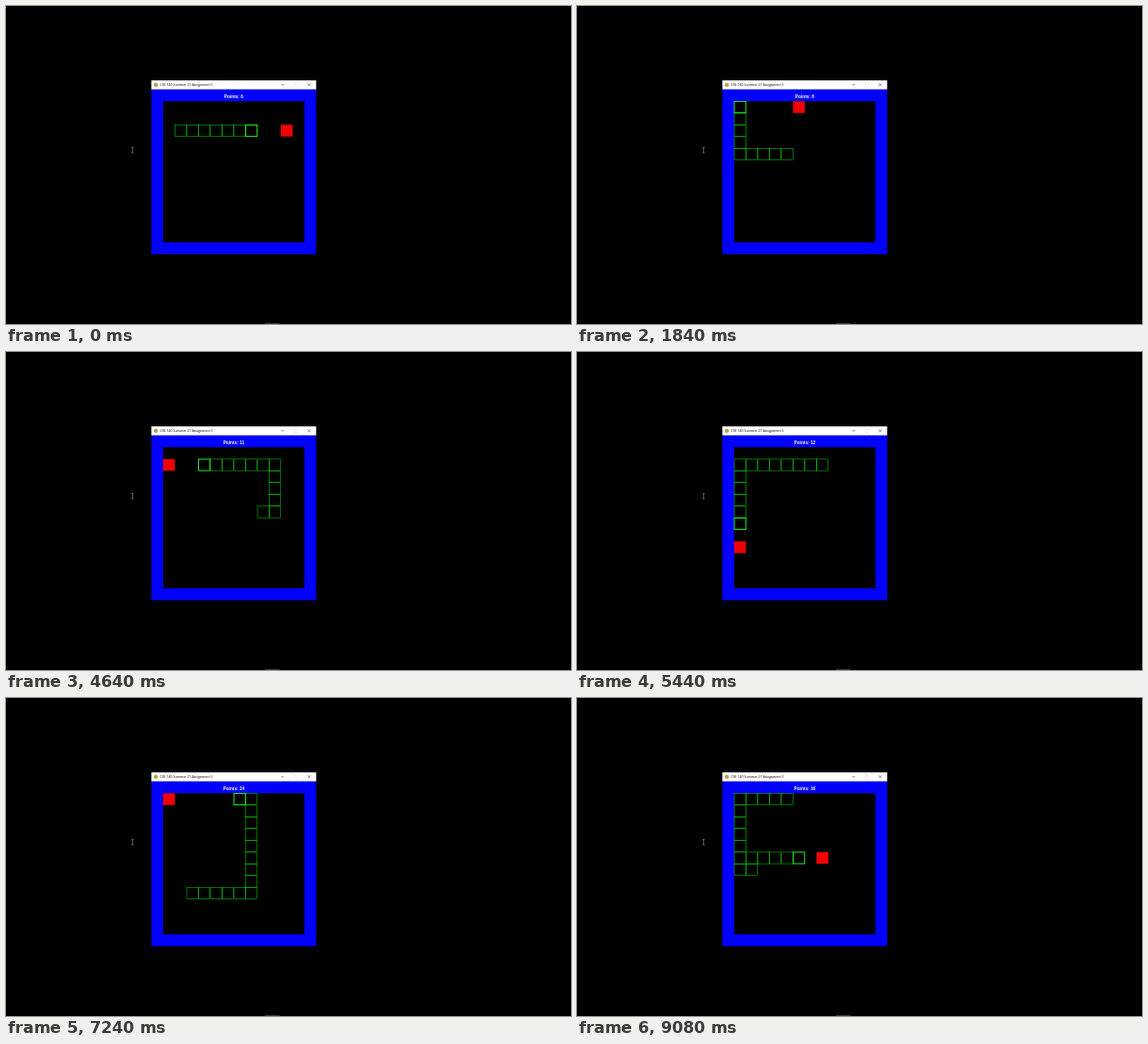
Write an HTML page with a canvas that moves like this. It is 600 by 338 pixels and loops after 9120 ms.

```html
<!DOCTYPE html>
<html lang="en">
<head>
<meta charset="utf-8">
<title>Snake</title>
<style>
  html, body { margin: 0; height: 100%; overflow: hidden; background: #000; }
  canvas { display: block; }
</style>
</head>
<body>
<canvas width="600" height="338"></canvas>
<script>
const ctx = document.querySelector('canvas').getContext('2d');
const LOOP = 9120, STEP = 100, LEAD = 90;
const SCALE = 0.3125;                       // drawn in screen pixels of a 1920 wide desktop
const WIN = { x: 494, y: 253, size: 560, bar: 31 };
const CELL = 40, FIELD = 480;
const FIELD_X = WIN.x + CELL, FIELD_Y = WIN.y + WIN.bar + CELL;
const START_LENGTH = 7, START_POINTS = 6;

const MOVES = 'R3 D2 L10 U4 R5 D1 L2 D3 R1 D1 R5 U4 L9 D7 R7 U8 L7 D6 R1 U1 R4';
const FOODS = [[10, 2], [0, 4], [5, 0], [4, 5], [9, 5], [0, 1],
               [0, 8], [7, 8], [0, 0], [1, 5], [7, 5]];
const DIRS = { R: [1, 0], L: [-1, 0], U: [0, -1], D: [0, 1] };

// Every cell the head visits, preceded by the starting body.
const trail = [];
for (let col = 1; col <= START_LENGTH; col++) trail.push([col, 2]);

// Foods eaten after each step.
const eaten = [0];
for (const move of MOVES.split(' ')) {
  const [dx, dy] = DIRS[move[0]];
  for (let i = +move.slice(1); i > 0; i--) {
    const [x, y] = trail[trail.length - 1];
    const count = eaten[eaten.length - 1];
    const [foodX, foodY] = FOODS[count];
    trail.push([x + dx, y + dy]);
    eaten.push(count + (x + dx === foodX && y + dy === foodY ? 1 : 0));
  }
}

function rect(color, x, y, w, h) {
  ctx.fillStyle = color;
  ctx.fillRect(x, y, w, h);
}

function line(color, width, ...points) {
  ctx.strokeStyle = color;
  ctx.lineWidth = width;
  ctx.beginPath();
  for (let i = 0; i < points.length; i += 4) {
    ctx.moveTo(points[i], points[i + 1]);
    ctx.lineTo(points[i + 2], points[i + 3]);
  }
  ctx.stroke();
}

function label(text, font, color, align, x, y) {
  ctx.font = font;
  ctx.fillStyle = color;
  ctx.textAlign = align;
  ctx.fillText(text, x, y);
}

function outline([col, row], color, width, inset) {
  ctx.strokeStyle = color;
  ctx.lineWidth = width;
  ctx.strokeRect(FIELD_X + col * CELL + inset, FIELD_Y + row * CELL + inset,
                 CELL - 2 * inset, CELL - 2 * inset);
}

function drawDesktop() {
  rect('#000', 0, 0, 1920, 1082);
  rect('#444', 880, 1078, 50, 3);
  line('#999', 2, 430, 481, 430, 499, 426, 481, 434, 481, 426, 499, 434, 499);
}

function drawWindow(points) {
  rect('#fff', WIN.x, WIN.y, WIN.size, WIN.bar);
  rect('#0000fb', WIN.x, WIN.y + WIN.bar, WIN.size, WIN.size);
  rect('#000', FIELD_X, FIELD_Y, FIELD, FIELD);

  ctx.fillStyle = '#b5a758';
  ctx.beginPath();
  ctx.arc(509, 268, 7.5, 0, 2 * Math.PI);
  ctx.fill();
  label('CSE 140 Summer 21 Assignment 5', '11.3px "Open Sans", sans-serif',
        '#000', 'left', 523, 272);
  line('#222', 1.5, 935, 268, 945, 268);
  ctx.strokeStyle = '#ccc';
  ctx.lineWidth = 1;
  ctx.strokeRect(981, 263, 10, 10);
  line('#222', 1.5, 1025, 263, 1035, 273, 1035, 263, 1025, 273);

  label('Points: ' + points, 'bold 15.2px "Liberation Sans", Arial, sans-serif',
        '#fff', 'center', 774, 313.5);
}

function drawGame(step) {
  const food = FOODS[eaten[step]];
  rect('#f00000', FIELD_X + food[0] * CELL, FIELD_Y + food[1] * CELL, CELL, CELL);

  // The tail grows one step after a food is eaten.
  const length = START_LENGTH + eaten[Math.max(0, step - 1)];
  const end = START_LENGTH + step;
  const body = trail.slice(end - length, end);
  const head = body.pop();
  for (const cell of body) outline(cell, '#0f0', 1.4, 0.5);
  outline(head, '#20ff20', 3, 0.5);
}

function frame() {
  const time = performance.now() % LOOP;
  const step = Math.min(Math.floor((time + LEAD) / STEP), eaten.length - 1);
  ctx.setTransform(SCALE, 0, 0, SCALE, 0, 0);
  drawDesktop();
  drawWindow(START_POINTS + eaten[step]);
  drawGame(step);
  requestAnimationFrame(frame);
}
frame();
</script>
</body>
</html>
```
